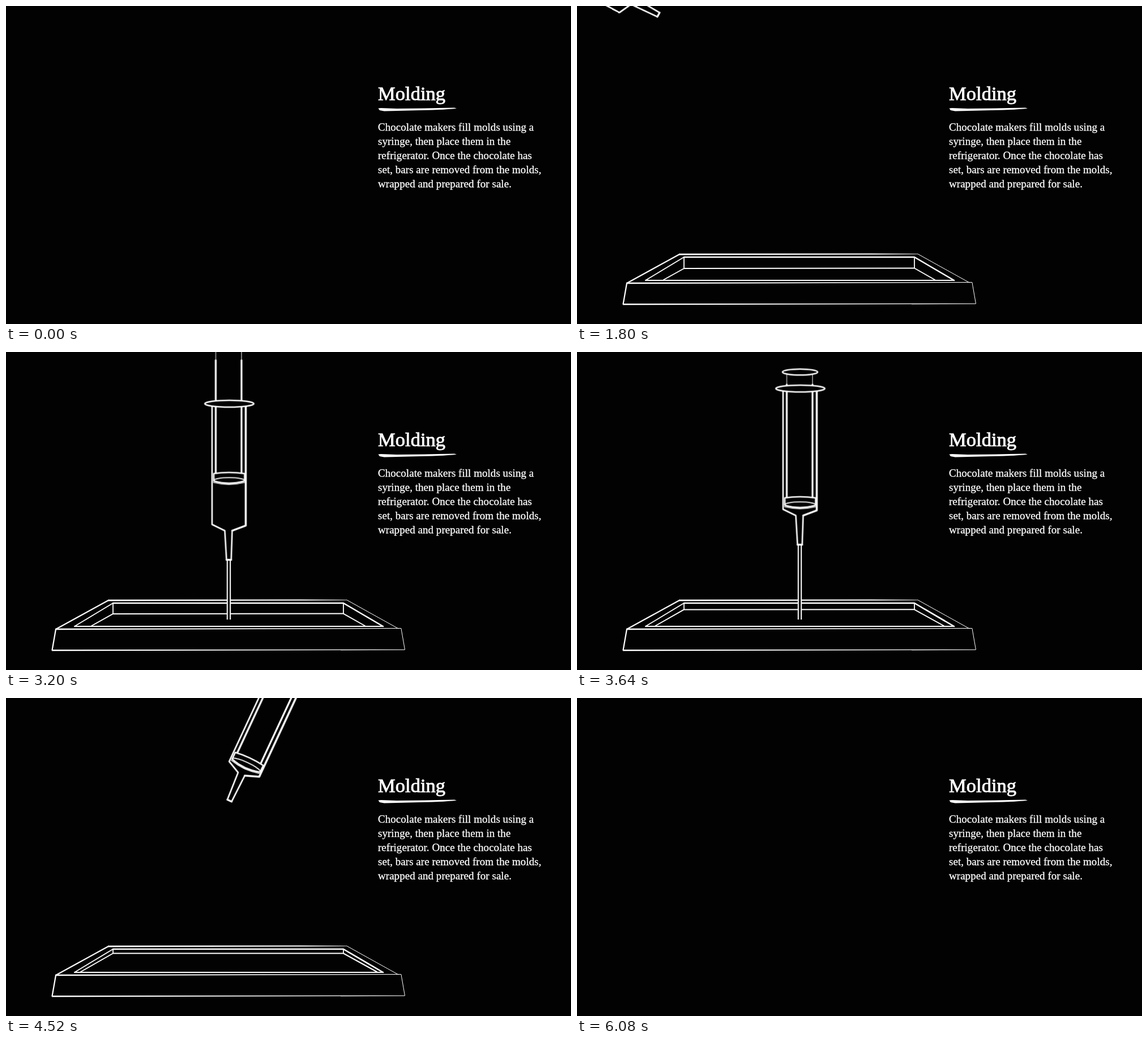
Write an HTML page that moves like this. It is 998 px wide and 561 px high and loops after 7040 ms.

```html
<!DOCTYPE html>
<html lang="en">
<head>
<meta charset="utf-8">
<title>Molding</title>
<style>
  html, body { margin: 0; height: 100%; overflow: hidden; background: #020202; }
  svg { display: block; width: 100vw; height: 100vh; }

  text { fill: #fff; stroke: #fff; font-family: "Liberation Serif", "Times New Roman", serif; }
  .title { font-size: 34.6px; stroke-width: .9px; }
  .body { font-size: 19.1px; stroke-width: .3px; }

  .line { fill: none; stroke: #fff; stroke-width: 2.6; stroke-linejoin: round; stroke-linecap: round; }
  .solid { fill: #020202; }
  .thin { stroke-width: 1; }
  .mid { stroke-width: 1.8; }
  .bold { stroke-width: 3.2; }
  .ink { fill: #fff; }

  .tray, .fill, .place, .tilt, .plunger, .level, .drop, .stream {
    animation: 7040ms cubic-bezier(.37, 0, .63, 1) infinite;
  }
  .tray { animation-name: tray; }
  .fill { animation-name: fill; }
  .place { animation-name: place; }
  .tilt { animation-name: tilt; }
  .plunger { animation-name: plunger; }
  .level { animation-name: level; }
  .drop { animation-name: drop; }
  .stream { animation-name: stream; }

  /* slides in from the right with a double overshoot, leaves to the left */
  @keyframes tray {
    0%, 1.705% { transform: translateX(925px); }
    9.943% { transform: translateX(-76px); }
    12.074% { transform: translateX(23px); }
    13.636%, 77.273% { transform: translateX(0); }
    80.966% { transform: translateX(84px); }
    86.932%, 100% { transform: translateX(-740px); }
  }

  /* chocolate surface in the tray */
  @keyframes fill {
    0%, 42.756% { d: path("M153 483L189 463L596 462.5L632 483"); }
    57.244%, 100% { d: path("M132 483L189 450.5L596 450.5L655 483"); }
  }

  /* nozzle tip position */
  @keyframes place {
    0%, 23.85% { transform: translate(130px, -500px); }
    23.864% { transform: translate(130px, -5px); }
    35.227% { transform: translate(393.5px, 376px); }
    36.364%, 43.75% { transform: translate(393.5px, 370.5px); }
    51.705%, 59.091% { transform: translate(393.5px, 340.5px); }
    70.384%, 100% { transform: translate(395.5px, -31.5px); }
  }

  @keyframes tilt {
    0%, 23.864% { transform: rotate(-65deg); }
    35.227%, 59.091% { transform: rotate(0deg); }
    63.068%, 100% { transform: rotate(25deg); }
  }

  @keyframes plunger {
    0%, 36.364% { transform: translateY(0); }
    52.557%, 100% { transform: translateY(176px); }
  }

  /* the plunger closes the gap to the chocolate, then pushes it */
  @keyframes level {
    0%, 36.364% { transform: translateY(0); }
    39.773%, 100% { transform: translateY(-14px); }
  }

  @keyframes drop {
    0%, 36.364% { transform: translateY(0); opacity: 1; }
    37.5% { transform: translateY(38px); opacity: 1; }
    37.51%, 100% { transform: translateY(38px); opacity: 0; }
  }

  @keyframes stream {
    0%, 37.216% { y: 338px; height: 0; animation-timing-function: ease-in; }
    40.057%, 52.557% { y: 338px; height: 134px; animation-timing-function: ease-in; }
    54.545%, 100% { y: 472px; height: 0; }
  }
</style>
</head>
<body>
<svg viewBox="0 0 998 561" preserveAspectRatio="none">
  <text class="title" x="657" y="165.5">Molding</text>
  <path class="ink" d="M657.5 180.5L662 180L690 181L740 180.4L792 179.6L796 180.7Q775 183 740 183.7L690 185L668 185.6L660 184Z"/>
  <g class="body">
    <text x="657" y="220">Chocolate makers fill molds using a</text>
    <text x="657" y="245">syringe, then place them in the</text>
    <text x="657" y="270">refrigerator. Once the chocolate has</text>
    <text x="657" y="294.7">set, bars are removed from the molds,</text>
    <text x="657" y="319.7">wrapped and prepared for sale.</text>
  </g>

  <g class="tray">
    <!-- outer rim and front face, strokes tapering to the right -->
    <path class="ink" d="M180 436.7L520 436.5L602 437V437.8L530 438.6L180 439.6Z"/>
    <path class="ink" d="M87 487.8L698 487V488L87 490.2Z"/>
    <path class="ink" d="M81 525L704 524.8V525.8L81 527.6Z"/>
    <path class="line" style="stroke-width:2.2" d="M181 438L88 489L81.5 526"/>
    <path class="line thin" d="M602 437.5L693 488M698 488L704.5 525"/>

    <!-- inner well -->
    <path class="line mid" d="M189 443V463M596 443V463"/>
    <path class="line solid fill" style="stroke-width:2" d="M153 483L189 463L596 462.5L632 483"/>
    <path class="line mid" d="M189 443L121 484"/>
    <path class="line" d="M189 443L596 443L666 484"/>
    <path class="line mid" d="M121 484L666 484"/>
  </g>

  <rect class="ink stream" x="389.8" y="338" width="7.4" height="0"/>
  <rect class="solid stream" x="391.8" y="338" width="3.4" height="0"/>

  <g class="place"><g class="tilt">
    <path class="line solid" d="M-29.5 -274V-63L-7 -52L-4 -1H4.3L6 -52L30 -61V-274"/>
    <path class="line bold" d="M30 -272V-61L6 -52M-4 -.5H4.3"/>
    <path class="line mid drop" d="M-5 -42Q0 -39.5 5 -42"/>

    <g class="plunger">
      <path class="line mid level" d="M-27 -228.5Q0 -221.5 28.5 -228.5"/>
      <path class="line solid" d="M-26.5 -258Q0 -262 28 -258V-245Q0 -237 -26.5 -245Z"/>
      <ellipse class="line mid" cx=".7" cy="-246" rx="27" ry="4.8"/>
      <path class="line thin" d="M-23 -480V-455M22.5 -480V-455"/>
      <path class="line bold" d="M-23 -458V-260M22.5 -458V-260"/>
      <ellipse class="line solid" cx=".5" cy="-480" rx="31" ry="5.3"/>
    </g>

    <ellipse class="line solid" cx="1" cy="-276" rx="43.3" ry="6"/>
  </g></g>
</svg>
</body>
</html>
```
